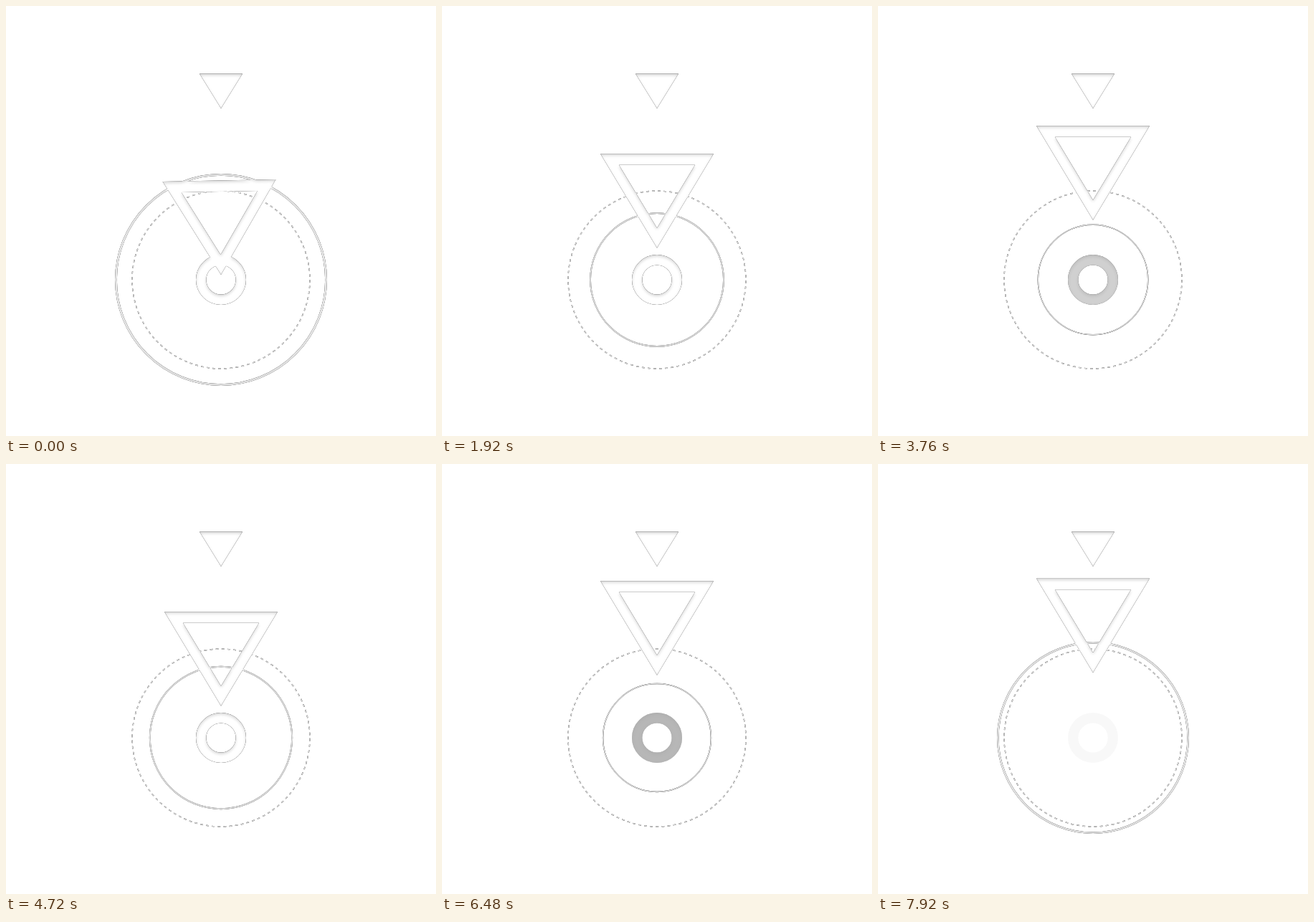
An HTML page that plays this animation: 600x600 px, repeating every 8 s.

```html
<!DOCTYPE html>
<html lang="en">
<head>
<meta charset="utf-8">
<title>Target</title>
<style>
html, body { margin: 0; height: 100%; overflow: hidden; background: #fff; }
svg { display: block; width: 100vw; height: 100vh; }
</style>
</head>
<body>
<svg viewBox="0 0 600 600">
  <!-- inner shadow from above, plus a hairline along every edge -->
  <filter id="inset" filterUnits="userSpaceOnUse" x="0" y="0" width="600" height="600" color-interpolation-filters="sRGB">
    <feFlood flood-color="#000"/>
    <feComposite in2="SourceAlpha" operator="out" result="outside"/>
    <feGaussianBlur stdDeviation="2"/>
    <feOffset dy="2"/>
    <feComponentTransfer><feFuncA type="linear" slope=".18"/></feComponentTransfer>
    <feComposite in2="SourceAlpha" operator="in" result="shade"/>
    <feGaussianBlur in="outside" stdDeviation=".4"/>
    <feComposite in2="SourceAlpha" operator="in" result="hairline"/>
    <feMerge>
      <feMergeNode in="SourceGraphic"/>
      <feMergeNode in="shade"/>
      <feMergeNode in="hairline"/>
    </feMerge>
  </filter>
  <g filter="url(#inset)" fill="#fff">
    <g fill="none" stroke="#fff" transform="translate(300 382)">
      <circle id="dots" r="124" stroke-width="1.4" pathLength="96" stroke-dasharray=".45 .55"/>
      <circle id="pulse"/>
      <circle id="hub" r="27.8" stroke-width="14.4"/>
    </g>
    <path id="small" d="M270 94.5H330L300 143Z"/>
    <!-- the origin is the tip -->
    <path id="arrow" fill-rule="evenodd" d="M-79-131.5H79L0 0ZM-53-116H53L0-28Z"/>
  </g>
</svg>
<script>
const LOOP = 8000, CYCLE = 2708;
const LOW = 1290, RISE = 1690;   // when the pulse is smallest, and how long it grows
const [dots, pulse, hub, small, arrow] =
  ['dots', 'pulse', 'hub', 'small', 'arrow'].map(id => document.getElementById(id));

const ramp = (t, from, to) => Math.min(1, Math.max(0, (t - from) / (to - from)));
const plateau = (t, up, full, down, end) => ramp(t, up, full) - ramp(t, down, end);

function draw(now) {
  const time = now % LOOP, t = time % CYCLE;
  const u = (t - LOW + CYCLE) % CYCLE;   // time since the pulse was smallest

  const r = 50 + 115 * plateau(u, 0, RISE, RISE, CYCLE);
  pulse.setAttribute('r', r);
  pulse.setAttribute('stroke-width', r * .019);

  const strike = plateau(u + LOW, 2504, 2711, CYCLE + 820, CYCLE + 1077);
  const hover = plateau(t, 1500, 1800, 2150, 2400);
  const tipY = 290.8 + 85 * strike + 47 * hover;
  const tilt = -1.1 * Math.exp(-t / 80) * Math.cos(t / 25);
  arrow.setAttribute('transform', `translate(300 ${tipY}) rotate(${tilt})`);

  // the hub blinks softly, the small triangle hard
  const blink = Math.min(...[275, 1085, 2504].map(mid => Math.abs(t - mid) / 40));
  hub.setAttribute('opacity', Math.min(1, blink));
  small.setAttribute('opacity', t > 950 && t < 1052 ? 0 : 1);
  dots.setAttribute('transform', `rotate(${time * .012})`);
}

const start = performance.now();
function tick() {
  draw(performance.now() - start);
  requestAnimationFrame(tick);
}
tick();
</script>
</body>
</html>
```
